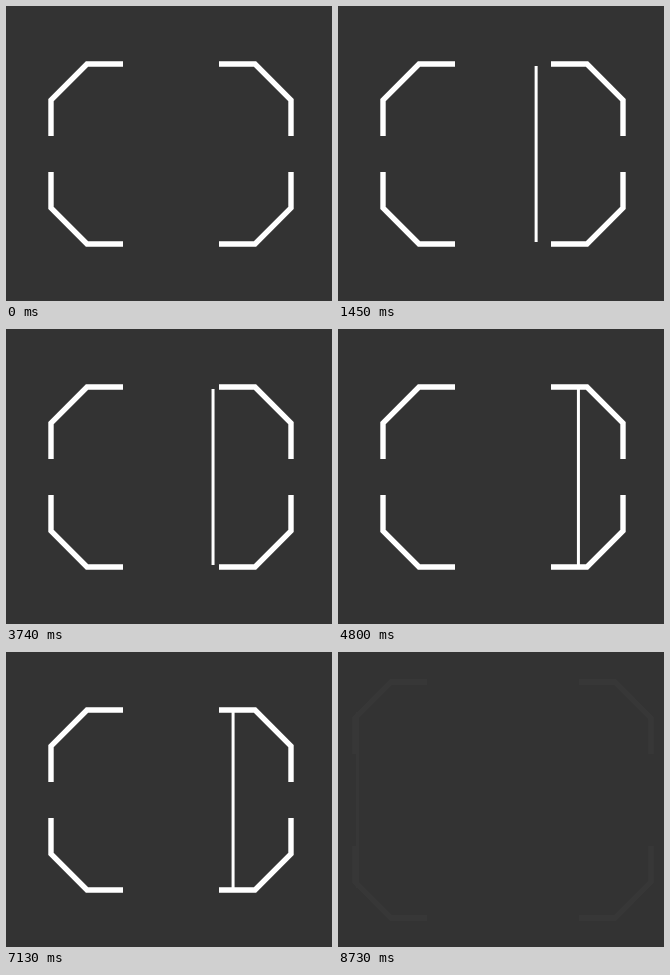
Recreate the animation shown at these times as an HTML page. Size 326 by 295 pixels, loop 8750 ms.

```html
<!DOCTYPE html>
<html lang="en">
<head>
<meta charset="utf-8">
<title>Scanner</title>
<style>
  html, body { margin: 0; width: 100%; height: 100%; overflow: hidden; background: #333; }
  svg { display: block; width: 326px; height: 295px; }
  polyline { fill: none; stroke: #fff; stroke-width: 5.4; }
  #beam { fill: #fff; }
</style>
</head>
<body>
<svg viewBox="0 0 326 295">
  <g id="scanner">
    <g id="corners"></g>
    <rect id="beam" y="60" width="3" height="176"/>
  </g>
</svg>
<script>
const LOOP = 8750;
const STEP = 20;
const LAST = 105;   // final step of one sweep
const ENTER = 13;   // steps the corners take to arrive
const SPREAD = 28;  // how far out the corners start

const scanner = document.getElementById('scanner');
const beam = document.getElementById('beam');
const corners = [[1, 1], [-1, 1], [1, -1], [-1, -1]].map(([sx, sy]) => {
  const el = document.createElementNS('http://www.w3.org/2000/svg', 'polyline');
  el.setAttribute('points', '-120,-18 -120,-54 -84,-90 -48,-90');
  document.getElementById('corners').append(el);
  return { el, place: `translate(165 148) scale(${sx} ${sy})` };
});

// Two sweeps to the right, then the same played backwards.
const sweeps = [
  { from: 110, to: 2230, first: 0, dir: 1 },
  { from: 2320, to: 4440, first: 0, dir: 1 },
  { from: 4440, to: 6540, first: LAST - 1, dir: -1 },
  { from: 6630, to: LOOP, first: LAST, dir: -1 },
];

function stepAt(t) {
  const s = sweeps.find(s => t >= s.from && t < s.to);
  return s ? s.first + s.dir * Math.floor((t - s.from) / STEP) : null;
}

function draw(t) {
  const k = stepAt(t);
  const resting = k === null;
  const enter = resting ? 1 : Math.min(1, k / ENTER);
  const out = SPREAD * (1 - enter ** 1.18);

  for (const { el, place } of corners) {
    el.setAttribute('transform', `${place} translate(${-out} ${-out})`);
  }
  scanner.setAttribute('opacity', resting ? 1 : Math.min(1, (k + 0.3) / 11));
  beam.setAttribute('visibility', resting ? 'hidden' : 'visible');
  if (resting) return;

  const p = k / LAST;
  const x = 45.9 + 235.2 * p + 0.7 * Math.sin(Math.PI * p) - out * (1 - 2 * p);
  beam.setAttribute('x', x.toFixed(2));
}

const start = performance.now();
function tick() {
  draw((performance.now() - start) % LOOP);
  requestAnimationFrame(tick);
}
draw(0);
requestAnimationFrame(tick);
</script>
</body>
</html>
```
